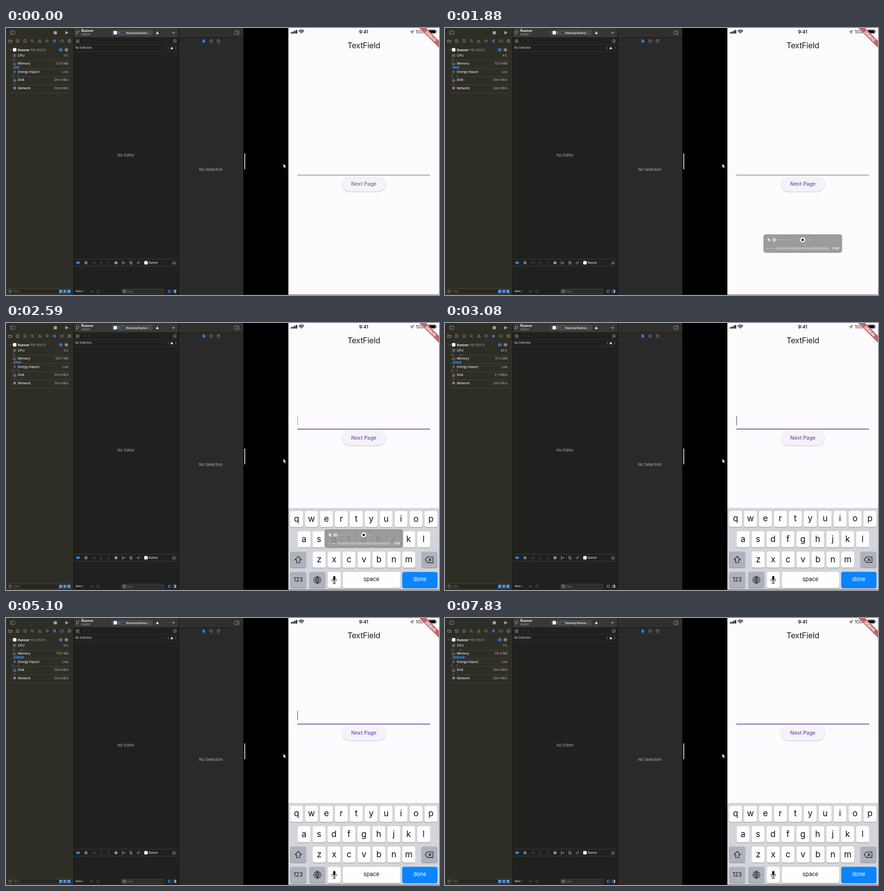
These frames come from a looping animation (874x540 px, 8000 ms). An HTML page:

```html
<!DOCTYPE html>
<html lang="en">
<head>
<meta charset="utf-8">
<title>TextField focus</title>
<style>
  html, body { margin: 0; width: 100%; height: 100%; overflow: hidden; background: #000; }
  svg { display: block; width: 874px; height: 540px; }
  text { font-family: Inter, Roboto, sans-serif; white-space: pre; }
</style>
</head>
<body>
<svg id="stage" viewBox="0 0 874 540" xmlns="http://www.w3.org/2000/svg"></svg>
<script>
const BLUE = '#2a80dc', DIM = '#a5a39d', FAINT = '#5c5b58', PURPLE = '#6750a4';

const rect = (x, y, w, h, fill, r = 0, more = '') =>
  `<rect x="${x}" y="${y}" width="${w}" height="${h}" rx="${r}" fill="${fill}" ${more}/>`;
const box = (x, y, w, h, color, r = 1) =>
  rect(x, y, w, h, 'none', r, `stroke="${color}" stroke-width=".7"`);
const dot = (x, y, r, fill, more = '') => `<circle cx="${x}" cy="${y}" r="${r}" fill="${fill}" ${more}/>`;
const ring = (x, y, r, color) => dot(x, y, r, 'none', `stroke="${color}" stroke-width=".7"`);
const fillPath = (d, fill) => `<path d="${d}" fill="${fill}"/>`;
const line = (d, color, w = .7) =>
  `<path d="${d}" fill="none" stroke="${color}" stroke-width="${w}" stroke-linecap="round" stroke-linejoin="round"/>`;
const text = (x, y, s, size, fill, weight = 400, anchor = 'start', more = '') =>
  `<text x="${x}" y="${y}" font-size="${size}" fill="${fill}" font-weight="${weight}" text-anchor="${anchor}" ${more}>${s}</text>`;
const group = (id, body, more = '') => `<g id="${id}" ${more}>${body}</g>`;

function sidebar() {
  let s = rect(0, 0, 136, 540, '#2f2e26');
  // toolbar
  s += box(9, 6, 9, 7, DIM) + line('M12 6v7', DIM) + rect(96.3, 6.4, 6.4, 6.4, DIM, .6)
     + fillPath('M119.8 6l6.6 3.6l-6.6 3.6z', DIM);
  // navigator tabs
  s += line('M5.2 29v-5h2.5l1 1h3.4v4zM5.2 26.2h6.9', DIM)
     + box(20.5, 23.5, 6, 6, DIM) + line('M22.2 25.2l2.6 2.6m0-2.6l-2.6 2.6', DIM)
     + line('M36.5 23.4h4v6l-2-1.7l-2 1.7z', DIM)
     + ring(52.6, 25.9, 2.2, DIM) + line('M54.2 27.5l1.8 1.8', DIM)
     + line('M68.2 23.6l3 5.4h-6zM68.2 25.6v1.4', DIM)
     + line('M83 23.2l3 3l-3 3l-3-3zM82 26.2h2', DIM)
     + rect(96.4, 24.3, 3.6, 5, BLUE, .8) + line('M95 24.3h1M94.8 26.3h1M95 28.2h1M98 23.2h2.4', BLUE, .9)
     + box(109.5, 24.3, 7, 4, DIM, 1.4)
     + box(125.2, 23.5, 5.6, 5.8, DIM) + line('M126.5 25.3h3M126.5 27.3h3', DIM);
  // process header
  s += line('M8 43.2l1.6 1.8l1.6-1.8', DIM) + rect(14, 40.5, 7, 7, '#fff', 1.6)
     + text(24, 46.5, 'Runner', 6.7, '#eceae4', 700) + text(49.5, 46.5, 'PID 55573', 6.3, DIM)
     + dot(110.6, 44.1, 3.4, BLUE) + line('M110.6 43.6v2M110.6 42.3v.1', '#20303f', .8)
     + ring(121.9, 44.1, 3.2, '#cfcdc6') + dot(121.9, 44.1, 1.7, '#cfcdc6');
  const rows = ['CPU', 'Memory', 'Energy Impact', 'Disk', 'Network'];
  rows.forEach((name, i) => {
    const y = 55.6 + i * 16.45;
    s += text(24, y + 2.4, name, 6.3, '#e8e6e0', 500)
       + text(126, y + 2.4, '', 6.2, '#b9b7b0', 400, 'end', `id="val${i}"`)
       + rect(9, y + 9.7, 120, .7, '#4b4a42');
  });
  s += box(14.7, 53, 5, 5, DIM) + rect(16.2, 54.5, 2, 2, DIM)
     + box(14.2, 70.3, 6, 3.4, DIM, .6) + line('M15.5 74.6v.6M17.2 74.6v.6M19 74.6v.6', DIM)
     + line('M18.2 85.6l-3 3.4h2.2l-1 2.8l3.2-3.7h-2.2z', DIM, .6)
     + line('M15 106.3l1-3.6h3l1 3.6v1.4h-5zM15 106.3h5', DIM)
     + dot(17.4, 121.4, 2.8, '#77756e') + line('M14.8 121.4h5.2M17.4 118.8v5.2', '#b0aea8', .5);
  // graph ticks
  s += rect(15, 60.5, 1, 5, BLUE) + rect(16, 64, 1.6, 1.5, BLUE)
     + rect(30, 63.6, 3, 1.9, BLUE, 0, 'id="spike"') + '<g id="memBars"></g>'
     + rect(13.4, 93.6, 1, 5, BLUE) + rect(15, 93.6, .8, 5, '#24588f') + rect(24, 93.6, 1, 5, BLUE)
     + rect(16.6, 110, 1, 5, BLUE);
  // filter field
  s += rect(2, 527.6, 131.5, 10, '#26251f', 2, 'stroke="#55534a" stroke-width=".7"')
     + ring(8.2, 532.6, 3, DIM) + line('M6.7 531.8h3M7.4 533.2h1.6', DIM, .6)
     + text(14, 534.8, 'Filter', 5.8, '#77756c')
     + [107, 115.3, 123.6].map((x, i) => rect(x, 529.2, 7, 7, i == 1 ? '#3f6c9d' : BLUE, 1)
       + line(`M${x + 1.6} 531.4h3.8M${x + 2.2} 533.8h2.6`, '#dce9f7', .7)).join('');
  return s;
}

function editor() {
  let s = rect(136, 0, 343, 540, '#20201f') + rect(349, 0, 130, 540, '#2a2a2a')
    + rect(136.5, 0, 342.5, 19.5, '#383735') + rect(349, 0, 130, 19.5, '#302f2e')
    + rect(136, 0, 1, 540, '#141412') + rect(348, 0, 1, 540, '#0d0d0d')
    + rect(137, 19.3, 342, .8, '#141414') + rect(137, 33, 342, .7, '#383838') + rect(137, 47, 211, .7, '#383838');
  // toolbar
  s += line('M142.5 7v5M142.5 10.5h2q2 0 2-2.4v-.8', DIM, .8) + dot(142.5, 6.6, 1, DIM) + dot(142.5, 12.4, 1, DIM) + dot(146.7, 6.6, 1, DIM)
    + text(152, 8.2, 'Runner', 6.9, '#f0f0f0', 700) + text(152, 14.8, 'master', 5.5, '#a9a8a6')
    + rect(213, 4, 83, 11, '#4a4947', 2.6) + rect(217, 6, 7, 7, '#fff', 1.6)
    + line('M227.2 7.6l1.3 2l-1.3 2', '#d0d0d0') + rect(234.5, 5.8, 4.5, 7.6, '#16324f', 1, 'stroke="#4b91d8" stroke-width=".7"')
    + text(243.2, 11.6, 'Running Runner...', 5.4, '#f2f2f2', 600)
    + fillPath('M305.5 6.6l3.1 5.6h-6.2z', '#ead9d6')
    + line('M335.6 9.6h5.2M338.2 7v5.2', '#b8b7b5', .8)
    + box(461.7, 6, 8.8, 7, '#b0afad') + line('M467.4 6v7', '#b0afad');
  // tab bars
  for (const x of [141.6, 145.2]) for (const y of [23.6, 27.2]) s += box(x, y, 2.4, 2.4, DIM, .4);
  s += line('M159.4 24l-2 2.3l2 2.3M167.4 24l2 2.3l-2 2.3', FAINT)
    + box(337.6, 23.6, 6, 5.6, DIM) + line('M340.6 23.6v5.6M341.8 26.4h1', DIM)
    + text(140, 42.2, 'No Selection', 5.5, '#dcdcdc')
    + line('M328.4 38l-2 2.2l2 2.2M341.4 38l2 2.2l-2 2.2', DIM) + fillPath('M334.7 37.6l2.9 5.2h-5.8z', '#e6e4e0')
    + fillPath('M396.7 22.9h3l2.2 2.2v4.6h-5.2z', BLUE)
    + ring(413.9, 26.4, 3, DIM) + line('M413.9 24.7v1.8l1.2.7', DIM) + ring(429, 26.4, 3, DIM)
    + text(429, 28.2, '?', 5, DIM, 500, 'middle');
  s += text(242.4, 260.2, 'No Editor', 7.9, '#a8a8a8', 400, 'middle')
    + text(413.4, 289.2, 'No Selection', 7.9, '#b0b0b0', 400, 'middle');
  // debug bar
  s += rect(137, 467, 211, .8, '#404040') + rect(137, 481.3, 211, .8, '#404040')
    + fillPath('M142 472.3h6l2 2.5l-2 2.5h-6z', BLUE)
    + rect(159.2, 471.8, 1.6, 6, '#b5b5b5') + rect(162.2, 471.8, 1.6, 6, '#b5b5b5')
    + line('M174 476q0-3 3-3t3 2.4M180.6 473.4l-.5 2l-2-.4M176 477.6h2', FAINT)
    + line('M192 471.6v4M190.4 474.2l1.6 1.6l1.6-1.6M189.4 477.8h5.2', FAINT)
    + line('M207 475.8v-4M205.4 473.2l1.6-1.6l1.6 1.6M204.4 477.8h5.2', FAINT)
    + fillPath('M222 471.6l3 1.6v3.4l-3 1.7l-3-1.7v-3.4z', '#a9a9a9') + line('M222 474.8v3M222 474.8l2.6-1.5M222 474.8l-2.6-1.5', '#303030', .5)
    + line('M235 472.6l4.4 2.2l-4.4 2.4z', DIM) + dot(235, 472.6, 1, DIM) + dot(239.8, 474.8, 1, DIM) + dot(235, 477.2, 1, DIM)
    + box(249.4, 472, 5.4, 2.3, DIM, 1.1) + box(249.4, 475.6, 5.4, 2.3, DIM, 1.1) + dot(250.8, 473.1, .9, DIM) + dot(253.5, 476.7, .9, DIM)
    + line('M264 475l6-3l-2.8 6l-.5-2.6z', DIM)
    + rect(275, 471.4, .7, 7, '#4a4a4a') + rect(279, 471.3, 7, 7, '#fff', 1.6)
    + text(288, 476.8, 'Runner', 5.5, '#dcdcdc', 500)
    + box(336.4, 472, 5.6, 5.6, DIM) + line('M337.4 475.9h3.6', DIM, 1);
  // console footer
  s += text(140.4, 534.4, 'Auto', 5.4, '#d8d8d8', 600) + line('M154.6 531.4l1.1-1.2l1.1 1.2M154.6 533.4l1.1 1.2l1.1-1.2', DIM, .6)
    + line('M169.4 532.6q3.2-3.8 6.4 0q-3.2 3.8-6.4 0z', FAINT) + dot(172.6, 532.6, 1.1, FAINT)
    + ring(186, 532.6, 3, FAINT) + line('M186 532.2v2M186 530.9v.1', FAINT)
    + rect(233.4, 528, 85.6, 9.6, '#2c2c2c', 2, 'stroke="#4e4e4e" stroke-width=".7"')
    + ring(238.6, 532.7, 3, '#cfcfcf') + line('M237.1 531.9h3M237.8 533.4h1.6', '#cfcfcf', .6)
    + text(244, 534.8, 'Filter', 5.4, '#858585')
    + box(327.3, 529.8, 5.6, 5.6, BLUE) + rect(327.6, 530, 1.9, 5.2, BLUE) + line('M331 531v3', BLUE)
    + box(337.6, 529.8, 5.6, 5.6, '#c0c0c0') + rect(340.6, 530, 2.4, 5.2, '#c0c0c0');
  return s;
}

function divider() {
  return rect(479, 0, 91, 540, '#000') + rect(480.8, 253.5, 2.2, 32.5, '#b4b4b4', 1.1)
    + `<path d="M559.9 274.4v8.3l1.9-1.7l1.3 2.8l1.3-.6l-1.3-2.7h2.5z" fill="#fff" stroke="#222" stroke-width=".4"/>`;
}

function phone() {
  let s = rect(570, 0, 304, 540, '#fefbff');
  // status bar
  [2.6, 4, 5.6, 7.2].forEach((h, i) => s += rect(575 + i * 3.4, 11.2 - h, 2.5, h, '#111', .5));
  s += line('M591.3 6.1q4.9-4 9.8 0M593.1 8.2q3.1-2.5 6.2 0', '#111', 1.5) + fillPath('M594.5 9.3q1.7-1.3 3.4 0l-1.7 2z', '#111')
    + text(722, 11, '9:41', 9.2, '#111', 600, 'middle')
    + line('M816.8 7.6l6-3l-3 6.2l-.5-2.8z', '#222', .8)
    + text(827, 11, '100%', 9.3, '#222')
    + rect(852.5, 3.3, 15.6, 8, 'none', 2, 'stroke="#333" stroke-width=".7"') + rect(853.6, 4.4, 13.4, 5.8, '#000', 1.1)
    + rect(869, 6, 1.2, 2.6, '#444', .6);
  s += text(722.2, 41, 'TextField', 16, '#1c1b1f', 400, 'middle', 'letter-spacing="-.28"');
  // input and button
  s += group('form', rect(588, 297, 268, .9, '#56545b', 0, 'id="underline"')
    + rect(588, 271, 1.2, 19, PURPLE, 0, 'id="caret"')
    + rect(678.7, 301, 87.2, 29.2, '#f6f2f9', 14.6, 'filter="url(#lift)"')
    + text(722.4, 319.1, 'Next Page', 10.2, PURPLE, 500, 'middle', 'id="label" letter-spacing=".12"'));
  s += group('keyboard', keyboard());
  s += `<g><path d="M834 0h14L874 26v14z" fill="#bd6869"/>`
    + text(0, 2.9, 'DEBUG', 7.6, '#fff', 800, 'middle', 'transform="translate(857.6 16.6) rotate(45)" letter-spacing=".1"') + '</g>';
  return `<g clip-path="url(#screen)">${s}</g>`;
}

function keyboard() {
  const key = (x, y, w, fill) => rect(x, y + 1, w, 32.6, '#8e9096', 4) + rect(x, y, w, 32.6, fill, 4);
  const grey = '#adb2bd';
  let s = rect(570, 374, 304, 168, '#d3d5da');
  [['qwertyuiop', 573.3], ['asdfghjkl', 588.6], ['zxcvbnm', 619.1]].forEach(([letters, x0], row) => {
    const y = 380 + row * 41.1;
    [...letters].forEach((c, i) => {
      const x = x0 + i * 30.15;
      s += key(x, y, 26.2, '#fefefe') + text(x + 13.1, y + 21.4, c, 17.2, '#111', 400, 'middle');
    });
  });
  s += key(573.3, 462.2, 32.8, grey) + line('M589.8 472l6.6 6.8h-3.4v6h-6.4v-6h-3.4z', '#111', 1.1)
    + key(838, 462.2, 33, grey) + line('M850.6 473h11.2v11.4h-11.2l-4.6-5.7zM853.2 476.2l5 5m0-5l-5 5', '#111', 1.1)
    + key(573.3, 503.3, 32.8, grey) + text(589.8, 522.8, '123', 11.4, '#111', 400, 'middle')
    + key(612.2, 503.3, 32.8, grey) + ring(628.5, 519.5, 7.4, '#111')
    + line('M621.1 519.5h14.8M628.5 512.1v14.8M622.7 515.2q5.8 2.4 11.6 0M622.7 523.8q5.8-2.4 11.6 0M628.5 512.1q-7 7.4 0 14.8q7-7.4 0-14.8', '#111', .9)
    + key(649.4, 503.3, 26.4, '#fefefe') + rect(660.3, 511.6, 4.6, 9.4, '#111', 2.3)
    + line('M658.2 518v1q0 4.4 4.4 4.4t4.4-4.4v-1M662.6 523.4v3.2M660 526.8h5.2', '#111', 1)
    + key(679.6, 503.3, 116.2, '#fefefe') + text(737.6, 522.3, 'space', 11.2, '#111', 400, 'middle')
    + key(799.9, 503.3, 71.1, '#0a84ff') + text(835.3, 522.3, 'done', 11.2, '#fff', 400, 'middle');
  return s;
}

function recorder() {
  let s = rect(642.8, 417.2, 158.8, 37.5, 'rgba(145,144,145,.89)', 5);
  s += fillPath('M651.4 427.2h1.6l2.6-2.2v7l-2.6-2.2h-1.6z', '#f2f2f2') + line('M651.6 425l5.4 7', '#f2f2f2', .8)
    + rect(664, 428, 34, 1, '#b5b4b5') + dot(664.6, 428.5, 4.1, '#cbcacb')
    + dot(722, 428.5, 5, '#fff') + dot(722, 428.5, 2.5, '#1d1d1d')
    + line('M733.8 428l1.8 1.8l1.8-1.8', '#f0f0f0', 1)
    + line('M649.6 446h5M658.6 446h6.2M656.4 446h.3', '#dcdcdc', .8);
  for (let x = 669.4; x < 775; x += 2.05) s += rect(x.toFixed(2), 443.4, 1.3, 5, '#c6c5c6');
  return s + text(782, 448.2, '0 KB', 5.9, '#fff', 600);
}

const stage = document.getElementById('stage');
stage.innerHTML = `<defs><clipPath id="screen"><rect x="570" width="304" height="540"/></clipPath>
  <filter id="lift" x="-10%" y="-20%" width="120%" height="150%">
    <feDropShadow dx="0" dy=".9" stdDeviation=".9" flood-color="#000" flood-opacity=".3"/></filter></defs>`
  + sidebar() + editor() + divider() + phone() + group('recorder', recorder()) + rect(0, 539.3, 874, .7, '#333');

const $ = id => document.getElementById(id);

// time, CPU, memory, disk
const STATS = [
  [0, '5%', '137.8 MB', 'Zero KB/s'],
  [240, '4%', '137.8 MB', 'Zero KB/s'],
  [1280, '4%', '137.9 MB', 'Zero KB/s'],
  [2180, '5%', '145.7 MB', 'Zero KB/s'],
  [3080, '48%', '171.2 MB', '2.7 MB/s'],
  [4100, '11%', '170.1 MB', 'Zero KB/s'],
  [5100, '9%', '170.1 MB', 'Zero KB/s'],
  [6110, '9%', '170.2 MB', 'Zero KB/s'],
  [7130, '7%', '170.4 MB', 'Zero KB/s'],
];
const LOOP = 8000, TICK = 100, FOCUS = 1980;
const clamp = v => Math.min(1, Math.max(0, v));
const spring = ms => { const k = Math.max(0, ms) * .02; return 1 - (1 + k) * Math.exp(-k); };

// solid for half a second, fade out, pause, fade in
function caretAlpha(t) {
  if (t < FOCUS) return 0;
  const p = ((t - 10) % 1000) / 1000;
  return p < .5 ? 1 : clamp(Math.max(1 - (p - .5) / .15, (p - .85) / .15));
}

let shown = -1;
function showStats(n) {
  if (n === shown) return;
  shown = n;
  const [, cpu, mem, disk] = STATS[n];
  [cpu, mem, 'Low', disk, 'Zero KB/s'].forEach((v, i) => $('val' + i).textContent = v);
  let bars = '';
  for (let i = 0; i < 7 + n; i++) bars += rect((15 + i * 1.65).toFixed(2), i % 8 ? 77.2 : 78.4, 1.25, i % 8 ? 4.5 : 3.3, BLUE);
  $('memBars').innerHTML = bars;
  $('spike').setAttribute('opacity', n >= 4 ? 1 : 0);
}

function draw(now) {
  const t = now % LOOP;
  const held = Math.max(0, Math.floor((t - 80) / TICK) * TICK + 80);
  showStats(STATS.filter(s => s[0] <= t).length - 1);

  const focused = t >= FOCUS;
  const line = $('underline');
  line.setAttribute('height', focused ? 1.7 : .9);
  line.setAttribute('y', focused ? 296.7 : 297);
  line.setAttribute('fill', focused ? PURPLE : '#56545b');
  $('caret').setAttribute('opacity', caretAlpha(held));
  $('label').setAttribute('fill', t < 480 ? '#6f7085' : t < 1280 ? '#6b6288' : PURPLE);

  $('form').setAttribute('transform', `translate(0 ${-83 * spring(held - 2108)})`);
  $('keyboard').setAttribute('transform', `translate(0 ${167 * (1 - spring(held - 2128))})`);

  const fadeIn = clamp((held - 380) / 300), fadeOut = clamp((3090 - held) / 390);
  $('recorder').setAttribute('opacity', Math.min(fadeIn, fadeOut));
}

const start = performance.now();
function frame() {
  draw(performance.now() - start);
  requestAnimationFrame(frame);
}
frame();
</script>
</body>
</html>
```
